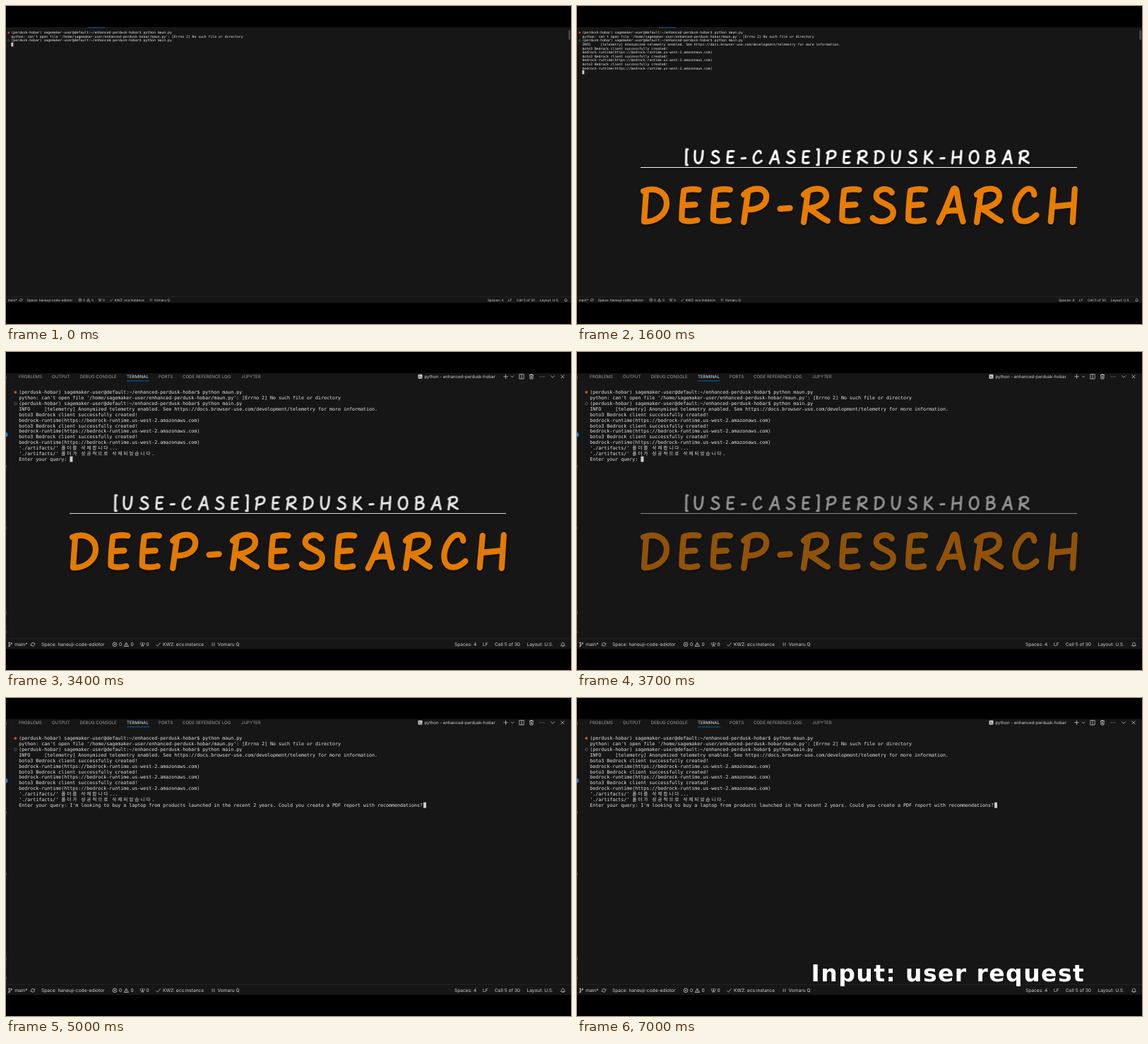
Recreate the animation shown at these times as an HTML page. Size 800 by 450 pixels, loop 8 s.

```html
<!DOCTYPE html>
<html lang="en">
<head>
<meta charset="utf-8">
<title>Terminal session</title>
<style>
  html, body { margin: 0; width: 100%; height: 100%; overflow: hidden; background: #000; }
  svg { display: block; width: 100%; height: 100%; }
  text { white-space: pre; text-rendering: geometricPrecision; fill: #d4d4d4; font-family: Inter, sans-serif; }
  .mono { font-family: "DejaVu Sans Mono", monospace; fill: #e6e6e6; }
  .ko { font-family: "Noto Sans CJK KR", "Noto Sans CJK", sans-serif; letter-spacing: .284em; }
  .bar text { font-size: 6.6px; }
  .tabs text { font-size: 6.1px; }
  .icon { fill: none; stroke: #ccc; stroke-width: .75; }
  .lettering { fill: none; stroke-width: 8.3; stroke-linecap: round; stroke-linejoin: round; }
  #title { filter: drop-shadow(1px 2px 1.5px rgba(0, 0, 0, .5)); }
  #caption { font: bold 33px "DejaVu Sans", sans-serif; letter-spacing: 1.45px; fill: #fff; }
</style>
</head>
<body>
<svg id="stage" viewBox="0 0 800 450">
  <rect width="800" height="450"/>
  <rect y="30" width="800" height="390" fill="#161616"/>
  <g id="far"></g>
  <g id="near"></g>
  <g id="title">
    <rect id="rule" y="228" height="1" fill="#f4f4f4"/>
    <g id="upper" class="lettering" stroke="#fff"></g>
    <g id="lower" class="lettering" stroke="#ff8900"></g>
  </g>
  <text id="caption" x="331.5" y="400.5">Input: user request</text>
</svg>
<script>
const LOOP = 8000, ZOOM_AT = 3300, PASTE_AT = 4600;
const $ = id => document.getElementById(id);

function add(parent, tag, attrs = {}, text) {
  const el = document.createElementNS("http://www.w3.org/2000/svg", tag);
  for (const key in attrs) el.setAttribute(key, attrs[key]);
  if (text) el.textContent = text;
  return parent.appendChild(el);
}
const show = (el, on) => el.setAttribute("display", on ? "inline" : "none");
const ramp = (t, from, to) => Math.min(1, Math.max(0, (t - from) / (to - from)));

// ---- terminal ----
const prompt = "(perdusk-hobar) sagemaker-user@default:~/enhanced-perdusk-hobar$ python ";
const client = ["boto3 Bedrock client successfully created!",
  "bedrock-runtime(https://bedrock-runtime.us-west-2.amazonaws.com)"];
const ask = "Enter your query: ";
const query = "I'm looking to buy a laptop from products launched in the recent 2 years. " +
  "Could you create a PDF report with recommendations?";
const lines = [
  prompt + "maun.py",
  "python: can't open file '/home/sagemaker-user/enhanced-perdusk-hobar/maun.py': [Errno 2] No such file or directory",
  prompt + "main.py",
  "INFO     [telemetry] Anonymized telemetry enabled. See https://docs.browser-use.com/development/telemetry for more information.",
  ...client, ...client, ...client,
  "'./artifacts/' 폴더를 삭제합니다...",
  "'./artifacts/' 폴더가 성공적으로 삭제되었습니다.",
  ask
];
// [time, number of lines printed from then on]
const output = [[0, 3], [1300, 4], [1400, 6], [1500, 8], [1600, 10], [2000, 13]];

function terminal(parent, x, y, cell, pitch, dotColor) {
  const dotX = x - cell * 1.25, dotY = y - pitch * .28;
  add(parent, "circle", { cx: dotX, cy: dotY, r: cell * .5, fill: dotColor });
  add(parent, "circle", { cx: dotX, cy: dotY + 2 * pitch, r: cell * .45, fill: "none", stroke: "#777", "stroke-width": cell * .16 });
  const rows = lines.map((line, i) => {
    const row = add(parent, "text", { class: "mono", x, y: y + i * pitch, "font-size": cell / .602 });
    for (const part of line.split(/([가-힣]+)/)) {
      if (part) add(row, "tspan", /[가-힣]/.test(part) ? { class: "ko" } : {}, part);
    }
    return row;
  });
  const cursor = add(parent, "rect", { width: cell, height: pitch, fill: "#ccc" });
  return t => {
    const count = output.filter(([time]) => t >= time).pop()[1];
    const done = count === lines.length;
    const last = ask + (t >= PASTE_AT ? query : "");
    rows.forEach((row, i) => show(row, i < count));
    rows[lines.length - 1].firstChild.textContent = last;
    cursor.setAttribute("x", x + (done ? last.length * cell : 0));
    cursor.setAttribute("y", y + (done ? count - 1 : count) * pitch - pitch * .78);
  };
}

// ---- editor chrome ----
const label = (parent, x, text, color = "#d4d4d4") =>
  add(parent, "text", { x, y: 2.3, style: `fill:${color}` }, text);
const icon = (parent, x, d) =>
  add(parent, "path", { class: "icon", d, transform: `translate(${x})` });
const ring = r => `M${-r} 0A${r} ${r} 0 1 1 ${r} 0A${r} ${r} 0 1 1 ${-r} 0Z`;

function statusBar(parent, leftTransform, rightTransform) {
  const left = add(parent, "g", { class: "bar", transform: leftTransform });
  const right = add(parent, "g", { class: "bar", transform: rightTransform });
  icon(left, 6, "M-1.5 -2V2M1.8 -1.2C1.8 .8 -1.5 0 -1.5 2M-2.2 -2.8h1.4v1h-1.4zM-2.2 2h1.4v1h-1.4zM1.1 -2.2h1.4v1h-1.4z");
  icon(left, 38, "M-2.5 -.5A2.6 2.6 0 0 1 2.5 -.5M3.4 -1.6L2.5 -.3L1.2 -1M2.5 .5A2.6 2.6 0 0 1 -2.5 .5M-3.4 1.6L-2.5 .3L-1.2 1");
  icon(left, 154, ring(2.9) + "M-1.2 -1.2L1.2 1.2M1.2 -1.2L-1.2 1.2");
  icon(left, 170.3, "M0 -2.8L3.2 2.7H-3.2ZM0 -.8V1M0 1.5V2.1");
  icon(left, 193.3, "M-2.5 -2.6Q-3.6 -1 -2.5 .6M2.5 -2.6Q3.6 -1 2.5 .6M-1.6 3L0 -1.2L1.6 3M-1.2 -2Q0 -3 1.2 -2M-1 1.4H1");
  icon(left, 215.5, "M-3 .4L-1 2.4L3 -2.4");
  icon(left, 293.5, "M-1.4 -2.4V2.4M1.4 -2.4V2.4");
  const leftItems = [[12.3, "main*"], [50, "Space: haneuji-code-ediotor"], [160, "0"], [176.5, "0"],
    [198.6, "0"], [222, "KWZ: ecs:instance"], [299.5, "Vomaru Q"]];
  const rightItems = [[635, "Spaces: 4"], [675, "LF"], [692, "Cell 5 of 30"], [737.5, "Layout: U.S."]];
  leftItems.forEach(([x, text]) => label(left, x, text));
  rightItems.forEach(([x, text]) => label(right, x - 800, text));
  icon(right, -11.5, "M-2.8 1.8C-1.8 .8 -2.2 -2.8 0 -2.8C2.2 -2.8 1.8 .8 2.8 1.8ZM-.8 2.8H.8");
}

function tabBar(parent) {
  const bar = add(parent, "g", { class: "tabs", transform: "translate(0 34.8)" });
  const tabs = [[18, "PROBLEMS"], [65, "OUTPUT"], [104.5, "DEBUG CONSOLE"], [171, "TERMINAL"],
    [216, "PORTS"], [250, "CODE REFERENCE LOG"], [333, "JUPYTER"]];
  for (const [x, text] of tabs) label(bar, x, text, text === "TERMINAL" ? "#e7e7e7" : "#9d9d9d");
  add(bar, "rect", { x: 171, y: 5.7, width: 32, height: .8, fill: "#0078d4" });
  add(bar, "rect", { x: 583.5, y: -3, width: 6, height: 6, rx: 1, fill: "#ccc" });
  icon(bar, 586.5, "M-1.6 -1.2L0 0L-1.6 1.2M.4 1.4H2").style.stroke = "#161616";
  label(bar, 592.5, "python - enhanced-perdusk-hobar");
  icon(bar, 707.5, "M-3.2 0H3.2M0 -3.2V3.2");
  icon(bar, 717, "M-2 -1L0 1L2 -1");
  icon(bar, 730, "M-3.2 -3.2H3.2V3.2H-3.2ZM0 -3.2V3.2");
  icon(bar, 744, "M-3 -2.4H3M-1 -2.4V-3.3H1V-2.4M-2.3 -2.4L-2 3.2H2L2.3 -2.4M-.7 -1V2M.7 -1V2");
  icon(bar, 759, "M-3.2 0H-2.2M-.5 0H.5M2.2 0H3.2");
  icon(bar, 774, "M-2.8 -1.4L0 1.4L2.8 -1.4");
  icon(bar, 788, "M-2.4 -2.4L2.4 2.4M2.4 -2.4L-2.4 2.4");
}

const far = $("far"), near = $("near");
add(far, "rect", { x: 116, y: 30, width: 24, height: 1, fill: "#0c5796" });
add(far, "rect", { x: 796.5, y: 34.5, width: 2.5, height: 13, fill: "#4c4c4c" });
add(far, "rect", { y: 411, width: 800, height: .6, fill: "#292929" });
statusBar(far, "translate(-6.2 416) scale(.7206)", "translate(800.9 416) scale(.7206)");
const drawFar = terminal(far, 7.4, 39.2, 2.886, 5.61, "#cf3f2c");

add(near, "rect", { x: 7, y: 30, width: .5, height: 375.5, fill: "#212121" });
add(near, "rect", { y: 405.3, width: 800, height: .6, fill: "#292929" });
add(near, "circle", { cx: -.6, cy: 117, r: 3.3, fill: "#1583d8" });
for (const y of [34, 160, 247, 367, 394]) add(near, "rect", { y, width: .8, height: 4, fill: "#555" });
tabBar(near);
statusBar(near, "translate(0 413.8)", "translate(800 413.8)");
const drawNear = terminal(near, 18.3, 59.3, 4.005, 7.88, "#b5522f");

// ---- brush lettering: [width, centre line], 48 units tall ----
const glyphs = {
  A: [33, "M0 48C8 34 16 12 20 2C22 -1 24 0 25 4C27 18 30 34 34 47M9 33C16 31 22 31 29 32"],
  B: [29, "M4 2L1 47M1 5C10 -3 27 -1 27 10C27 18 15 22 5 23C18 20 30 24 30 33C30 44 14 49 1 47"],
  C: [31, "M28 9C27 -1 18 -2 11 6C3 15 -1 28 2 38C6 50 20 49 31 38"],
  D: [33, "M4 4L1 46M0 4C18 -3 33 6 33 21C33 38 16 48 1 47"],
  E: [24, "M25 2C16 0 9 2 4 3C2 18 1 34 1 44C7 48 15 47 23 45M3 24L20 23"],
  H: [34, "M4 2L0 47M34 1L31 48M2 26L32 23"],
  K: [30, "M4 2L1 48M27 2C20 13 12 21 4 26C14 30 22 39 30 47"],
  O: [34, "M18 1C6 2 0 16 1 29C2 42 10 48 18 47C28 46 34 34 33 21C32 8 27 0 18 1Z"],
  P: [31, "M6 5L0 48M0 9C10 -2 32 -3 32 12C32 26 16 31 4 30"],
  R: [33, "M6 5L0 48M0 9C10 -2 32 -3 32 11C32 22 16 28 5 28C15 32 24 42 34 46"],
  S: [29, "M27 6C22 -2 5 0 5 11C5 22 29 21 29 34C29 47 9 51 0 42"],
  U: [32, "M2 1C0 18 -2 47 14 47C28 47 30 22 31 1"],
  "[": [1, "M6 -5H1L0 53H5"],
  "]": [6, "M0 -5H6L5 53H-1"],
  "-": [13, "M0 29L14 28"]
};
function letter(group, text, x, y, scale, gap) {
  group.setAttribute("role", "img");
  group.setAttribute("aria-label", text);
  group.setAttribute("transform", `translate(${x} ${y}) scale(${scale})`);
  let pen = 0;
  for (const char of text) {
    const [width, d] = glyphs[char];
    add(group, "path", { d, transform: `translate(${pen})` });
    pen += width + gap;
  }
}
letter($("upper"), "[USE-CASE]PERDUSK-HOBAR", 154.5, 204.8, .375, 31);
letter($("lower"), "DEEP-RESEARCH", 94, 258, 1, 20.4);

function draw(t) {
  const zoomed = t >= ZOOM_AT;
  show(far, !zoomed);
  show(near, zoomed);
  (zoomed ? drawNear : drawFar)(t);

  const half = 309 * (1 - (1 - ramp(t, 100, 1350)) ** 3);
  $("rule").setAttribute("x", 399 - half);
  $("rule").setAttribute("width", 2 * half);
  $("upper").setAttribute("opacity", ramp(t, 400, 1400));
  $("lower").setAttribute("opacity", ramp(t, 700, 1700));
  $("title").setAttribute("opacity", 1 - ramp(t, 3300, 4150));
  $("caption").setAttribute("opacity", ramp(t, 5500, 6000));
}
function tick() {
  draw(performance.now() % LOOP);
  requestAnimationFrame(tick);
}
tick();
</script>
</body>
</html>
```
